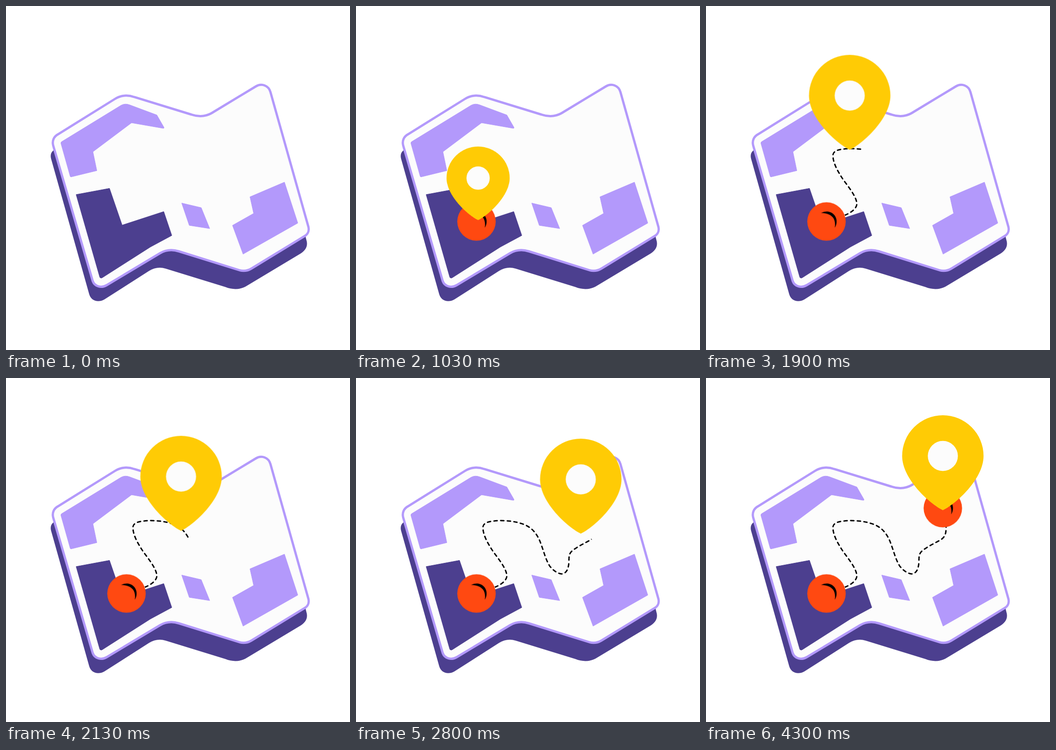
Animation of 748 by 748 pixels, one loop 5.01 s. Source, as an HTML page without scripts:

```html
<!DOCTYPE html>
<html lang="en">
<head>
<meta charset="utf-8">
<title>Map route</title>
<style>
  html, body { margin: 0; width: 100%; height: 100%; overflow: hidden; background: #fff; }
  svg { display: block; width: 100%; height: 100%; }

  .light { fill: #b399fb; stroke: #b399fb; }
  .dark { fill: #4c3f8f; stroke: #4c3f8f; }
  .blocks { stroke-width: 1; stroke-linejoin: round; }
  .sheet { fill: #fcfcfc; stroke: #b399fb; stroke-width: 5; }
  .dashes { fill: none; stroke: #000; stroke-width: 3; stroke-linecap: round; stroke-dasharray: 7 7.5; }
  .reveal { fill: none; stroke: #fff; stroke-width: 12; stroke-dasharray: 545 1090; }

  .reveal, .start, .end, .pin, .grow { animation: 5.01s linear infinite; }
  .reveal { animation-name: draw; }
  .start { animation-name: pop-start; }
  .end { animation-name: pop-end; }
  .pin { animation-name: travel; }
  .grow { animation-name: grow; }

  @keyframes pop-start {
    0%, .6% { transform: scale(0); animation-timing-function: cubic-bezier(.4, .2, .6, 1); }
    10.6% { transform: scale(1); }
    12.2% { transform: scale(1.035); }
    14%, 100% { transform: scale(1); }
  }
  @keyframes pop-end {
    0%, 60.4% { transform: scale(0); animation-timing-function: cubic-bezier(.4, .2, .6, 1); }
    70.4% { transform: scale(1); }
    72% { transform: scale(1.035); }
    73.8%, 100% { transform: scale(1); }
  }
  @keyframes grow {
    0%, 14.5% { transform: scale(0); animation-timing-function: cubic-bezier(.4, .1, .8, .9); }
    20.5%, 21.7% { transform: scale(.775); }
    21.95%, 100% { transform: scale(1); }
  }
  @keyframes draw {
    0%, 23.4% { stroke-dashoffset: 545; }
    37.9% { stroke-dashoffset: 316; }
    47.9% { stroke-dashoffset: 158; }
    55.9% { stroke-dashoffset: 38; }
    58.5%, 100% { stroke-dashoffset: 0; }
  }
  /* position of the pin's tip */
  @keyframes travel {
    0%, 22% { transform: translate(265.5px, 466px); }
    24% { transform: translate(291px, 461px); }
    26% { transform: translate(311px, 445px); }
    28% { transform: translate(315px, 423px); }
    30% { transform: translate(303px, 401px); }
    31.6% { transform: translate(294px, 380px); }
    32.6% { transform: translate(290px, 361px); }
    34% { transform: translate(288px, 343px); }
    36% { transform: translate(294px, 322px); }
    38% { transform: translate(313px, 313px); }
    40% { transform: translate(345px, 309px); }
    42% { transform: translate(375px, 325px); }
    44% { transform: translate(396px, 354px); }
    46% { transform: translate(415px, 383px); }
    48% { transform: translate(440.5px, 404px); }
    49.2% { transform: translate(453px, 407px); }
    50.5% { transform: translate(463px, 399px); }
    52% { transform: translate(466px, 381px); }
    54% { transform: translate(473px, 358px); }
    56% { transform: translate(489.5px, 338px); }
    58% { transform: translate(505px, 319px); }
    60.5%, 100% { transform: translate(515px, 288px); }
  }
</style>
</head>
<body>
<svg viewBox="0 0 748 748">
  <defs>
    <path id="route" pathLength="545" d="M302 455C316 449 328 440 328 430C327 412 305 388 296 374C285 357 276 340 276 325C276 314 290 311 313 310C333 310 350 313 358 316C380 322 392 336 400 355C408 375 412 395 422 410C430 419 438 425 447 426C458 425 462 415 463 400C463 388 463 382 470 376C482 366 498 359 510 352C520 346 522 338 522 326V316"/>
    <mask id="drawn" maskUnits="userSpaceOnUse" x="0" y="0" width="748" height="748">
      <use href="#route" class="reveal"/>
    </mask>
    <g id="ball">
      <circle r="41.8" fill="#ff4911"/>
      <path d="M-12-18.5Q-4-22.5 4-21.5C16-19.5 22-9 22-.5Q22 7.5 18 13.5Q20 2 15.500-6.500Q8-18-12-18.5Z"/>
    </g>
  </defs>

  <path fill="#4c3f8f" d="M103 314C98 318 96 324 98 332L181 627C185 641 200 646 214 638L311 576C322 569 335 567 347 571L477 611C492 617 508 617 521 610L641 538C652 531 656 522 654 512L651 500Z"/>
  <path class="sheet" d="M102.500 303C100 293 104 284 113 279L237 202C250 194 265 193 279 198L403 236C418 241 433 241 447 233L543 175C556 167 571 173 575 187L657.500 480C659.500 488 657 496 649 500.500L533.500 571C525 576 515 577 506 574L376 533.500C362 529 348 530 335 537.500L219 607C207 614 193 610 188.500 598Z"/>

  <g class="blocks">
    <path class="light" d="M121 295L250 216Q259 211 269 215L328 237L343.5 264Q344 266 342 266L273 254L189 317L197.500 358L142 371.500Q140 372 139.500 370L119.500 299Q119 296 121 295Z"/>
    <path class="dark" d="M152.500 410L225 396.500L252.500 476.500L343 447L360.500 499L314 524L209 591Q206 592.500 204 590Z"/>
    <path class="light" d="M382 428.500L424.500 438.500L443 484L398.500 477Z"/>
    <path class="light" d="M530.500 415L605.500 383L634.500 472L515.500 539.500L492.500 477L538.500 451Z"/>
  </g>

  <g mask="url(#drawn)"><use href="#route" class="dashes"/></g>

  <g transform="translate(262 468.500)"><use href="#ball" class="start"/></g>
  <g transform="translate(515 283)"><use href="#ball" class="end"/></g>

  <g class="pin">
    <g class="grow">
      <path fill="#ffcb05" d="M0-.5C-28-14-88.500-68-88.500-118.500A88.500 88.500 0 0 1 88.500-118.500C88.500-68 28-14 0-.5Z"/>
      <circle cy="-118.500" r="32.700" fill="#fcfcfc"/>
    </g>
  </g>
</svg>
</body>
</html>
```
